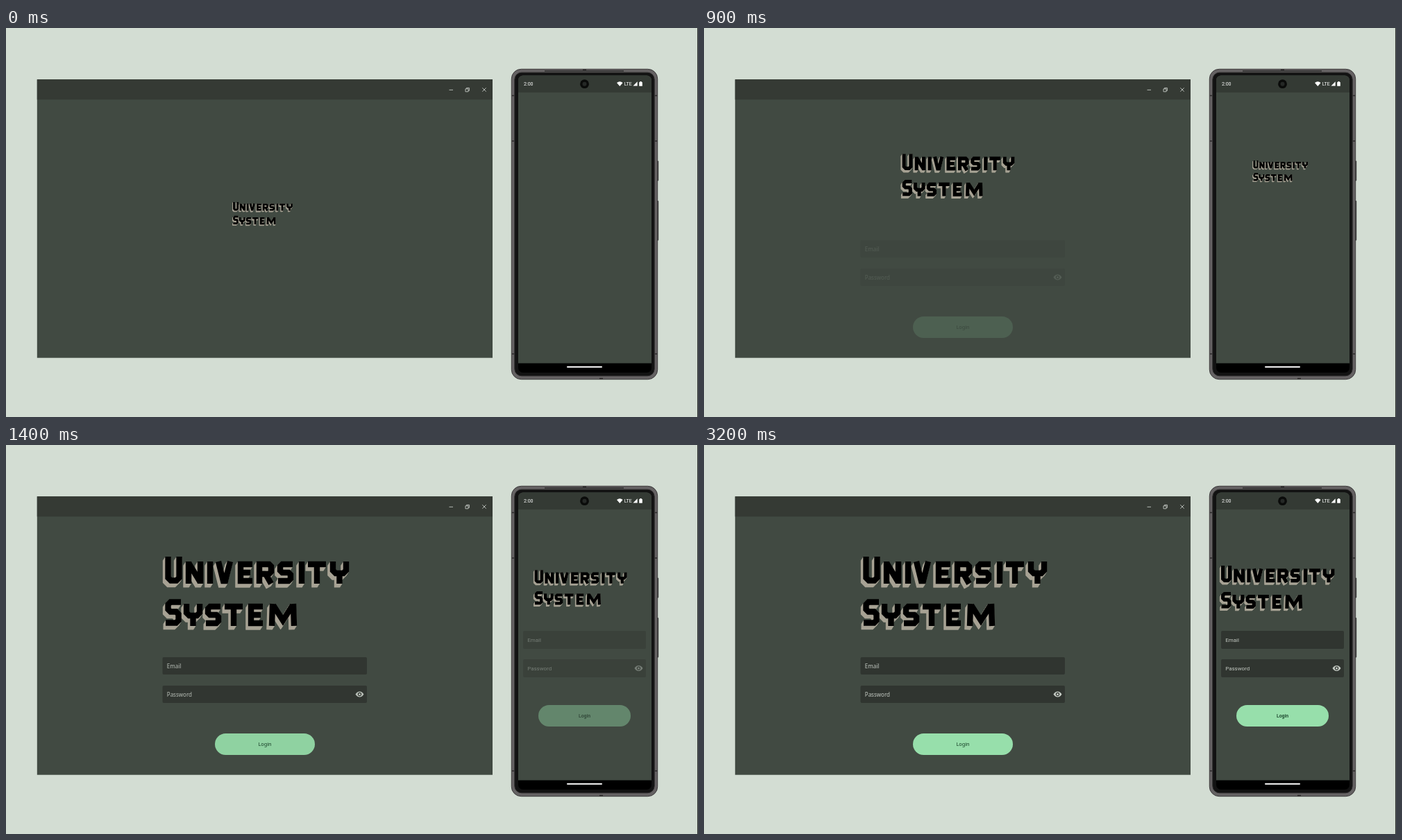
These frames come from a looping animation (997x561 px, 3.3 s). An HTML page:

```html
<!DOCTYPE html>
<html lang="en">
<head>
<meta charset="utf-8">
<title>University System</title>
<style>
  html, body { margin: 0; width: 100%; height: 100%; overflow: hidden; background: #d3ddd3; }
  svg { display: block; width: 100%; height: 100%; }
  .desktop { font-family: "Noto Sans", "Open Sans", sans-serif; }
  .phone { font-family: Roboto, sans-serif; }
  .label { font-size: 8px; fill: #c3c9c2; }
  .login { font-weight: 500; fill: #123a22; text-anchor: middle; }
  .glyphs { fill: none; stroke-width: 8.4; }
</style>
</head>
<body>
<svg id="stage" viewBox="0 0 997 561"></svg>
<script>
// Lettering: centre lines of each glyph, drawn with a thick stroke.
const GLYPHS = {
  U: "M4.5 0V30.5L8.5 34.5H16.5L20.5 30.5V0",
  S: "M23 4.5H8L4.5 8V15L8 18.5H16L19.5 22V31L16 34.5H1",
  n: "M4 32V0M21 32V0M4 2L21 30",
  i: "M4 0V32",
  v: "M4 0L11 28H14L21 0",
  e: "M21 4H4V28H21M4 16H18",
  r: "M4 32V4H18L21 7V15L18 18H4M13 18L21 32",
  s: "M22 4H7L4 7V13L7 16H16L19 19V25L16 28H1",
  t: "M0 4H26M13 4V32",
  y: "M4 0V13L8 17H19L23 13V0M13.5 17V32",
  m: "M4 32L5 0M36 32L35 0M6 2L20 24 34 2"
};
const LINES = [
  { text: "University", top: 161, x: [229, 259, 290, 302, 334, 361, 391, 422, 435, 467] },
  { text: "System", top: 222, x: [229, 256, 287, 315, 349, 379] }
];
const LOOP = 3300, STEP = 100;
const PIVOT = { x: 374, y: 213.5 };

const rect = (x, y, w, h, fill, r = 0, extra = "") =>
  `<rect x="${x}" y="${y}" width="${w}" height="${h}" rx="${r}" fill="${fill}" ${extra}/>`;
const text = (x, y, cls, str, size = 8) =>
  `<text x="${x}" y="${y}" class="${cls}" style="font-size:${size}px">${str}</text>`;

const lettering = LINES.map(({ text, top, x }) =>
  [...text].map((c, i) =>
    `<path d="${GLYPHS[c]}" transform="translate(${x[i]} ${top + (i ? 7 : 0)})"/>`
  ).join("")).join("");

const extrusion = Array.from({ length: 8 }, (_, i) => {
  const k = (8 - i) / 8;
  return `<use href="#lettering" x="${-3.5 * k}" y="${5.5 * k}" stroke="#a7a294"/>`;
}).join("");

const title = id =>
  `<g id="${id}" class="glyphs">${extrusion}<use href="#lettering" stroke="#000"/></g>`;

const eye = (x, y) => `<g transform="translate(${x} ${y})">
  <path d="M-6 0Q-3.6-4 0-4T6 0Q3.6 4 0 4T-6 0Z" fill="#c3c9c2"/>
  <circle r="2.1" fill="none" stroke="#303530" stroke-width="1.2"/></g>`;

function form(id, { x, w, h, rows, button, size, loginSize }) {
  const [bx, by, bw, bh] = button;
  return `<g id="${id}" opacity="0">
    ${rows.map((y, i) => rect(x, y, w, h, "#303530", 2) +
      text(x + 6.3, y + h / 2 + 3, "label", ["Email", "Password"][i], size)).join("")}
    ${eye(x + w - 10.5, rows[1] + h / 2)}
    ${rect(bx, by, bw, bh, "#97dfab", bh / 2)}
    ${text(bx + bw / 2, by + bh / 2 + 2.7, "login", "Login", loginSize)}
  </g>`;
}

const desktop = `<g class="desktop">
  ${rect(44.8, 74.2, 656.2, 401.5, "#414a42")}
  ${rect(44.8, 74.2, 656.2, 29, "#353a34")}
  <g fill="none" stroke="#c5c9c4" stroke-width=".9">
    <path d="M638.5 89.3H644M686.3 86.3L691.7 91.7M691.7 86.3L686.3 91.7"/>
    <path d="M662 87.8H666V91.8H662ZM663.4 87.6V86.4H667.4V90.4H666.2"/>
  </g>
  ${form("desktopForm", { x: 225.5, w: 294.5, h: 25, rows: [306, 347],
    button: [301, 416, 144, 31], size: 8, loginSize: 7.3 })}
  ${title("desktopTitle")}
</g>`;

const phone = `<g class="phone">
  ${rect(937, 191.5, 3.2, 29, "#3b393a", 1)}${rect(937, 249, 3.2, 57.5, "#3b393a", 1)}
  ${rect(728.3, 59.3, 210.4, 447.4, "#656263", 14, 'stroke="#3c3a3b" stroke-width="1"')}
  ${rect(732.8, 64.2, 201.4, 437.6, "#121212", 10, 'stroke="#2c2a2b" stroke-width="1"')}
  <path d="M776 62H890" stroke="#2b2a2a" stroke-width="1.6"/>
  <path d="M729 97.5H732M729 163H732M729 470H732M935 97.5H938M935 163H938M935 470H938M831 60.3H836M855 505.5H860"
    stroke="#2c2a2b" stroke-width="1.5"/>
  <clipPath id="screen">${rect(738, 68.5, 192, 428.5, "#000", 7)}</clipPath>
  <g clip-path="url(#screen)">
    ${rect(738, 68, 192, 416, "#414a42")}
    ${rect(738, 68, 192, 25, "#343a34")}
    ${rect(738, 483.5, 192, 14, "#000")}
  </g>
  ${rect(808, 487.8, 51, 2, "#fff", 1)}
  <circle cx="833.5" cy="80.7" r="6.4" fill="#0a0b0a"/>
  <circle cx="833.5" cy="80.7" r="3" fill="#252826"/>
  <g fill="#fff">
    ${text(746, 83.2, "", "2:00", 7)}
    ${text(890.7, 83.2, "", "LTE", 7)}
    <path d="M880 79Q884.3 75.6 888.6 79L884.3 84ZM903.5 83.5L909.7 77.3V83.5Z"/>
    ${rect(912.2, 78, 4.6, 5.8, "#fff", .6)}${rect(913.4, 77, 2.2, 1.4, "#fff")}
  </g>
  ${form("phoneForm", { x: 745, w: 177, h: 26, rows: [268, 309],
    button: [767, 375, 133, 31], size: 7.9, loginSize: 6.9 })}
  ${title("phoneTitle")}
</g>`;

document.getElementById("stage").innerHTML = `
  <defs><g id="lettering">${lettering}</g></defs>
  ${rect(0, 0, 997, 561, "#d3ddd3")}
  ${rect(996, 0, 1, 561, "#2d302d")}
  ${desktop}${phone}`;

// Each title slides up, then grows while its form fades in.
const SCENES = [
  { name: "desktop", x: 374, appear: 0, fromY: 289, toY: 213.5, small: .324, big: 1,
    slide: [-248, 452], grow: [480, 1410], fade: [680, 1560] },
  { name: "phone", x: 834.3, appear: 100, fromY: 288, toY: 206.5, small: .294, big: .617,
    slide: [113, 813], grow: [848, 1778], fade: [1015, 1895] }
].map(s => ({
  ...s,
  title: document.getElementById(s.name + "Title"),
  form: document.getElementById(s.name + "Form")
}));

const mix = (a, b, k) => a + (b - a) * k;

// Sine ease-in-out over a time span
function eased(t, [from, to]) {
  const k = Math.min(1, Math.max(0, (t - from) / (to - from)));
  return (1 - Math.cos(Math.PI * k)) / 2;
}

function draw(t) {
  for (const s of SCENES) {
    const y = mix(s.fromY, s.toY, eased(t, s.slide));
    const scale = mix(s.small, s.big, eased(t, s.grow));
    s.title.setAttribute("transform",
      `translate(${s.x} ${y}) scale(${scale}) translate(${-PIVOT.x} ${-PIVOT.y})`);
    s.title.setAttribute("visibility", t < s.appear ? "hidden" : "visible");
    s.form.setAttribute("opacity", eased(t, s.fade));
  }
}

const start = performance.now();
function tick() {
  const t = (performance.now() - start) % LOOP;
  draw(Math.floor(t / STEP) * STEP);
  requestAnimationFrame(tick);
}
tick();
</script>
</body>
</html>
```
